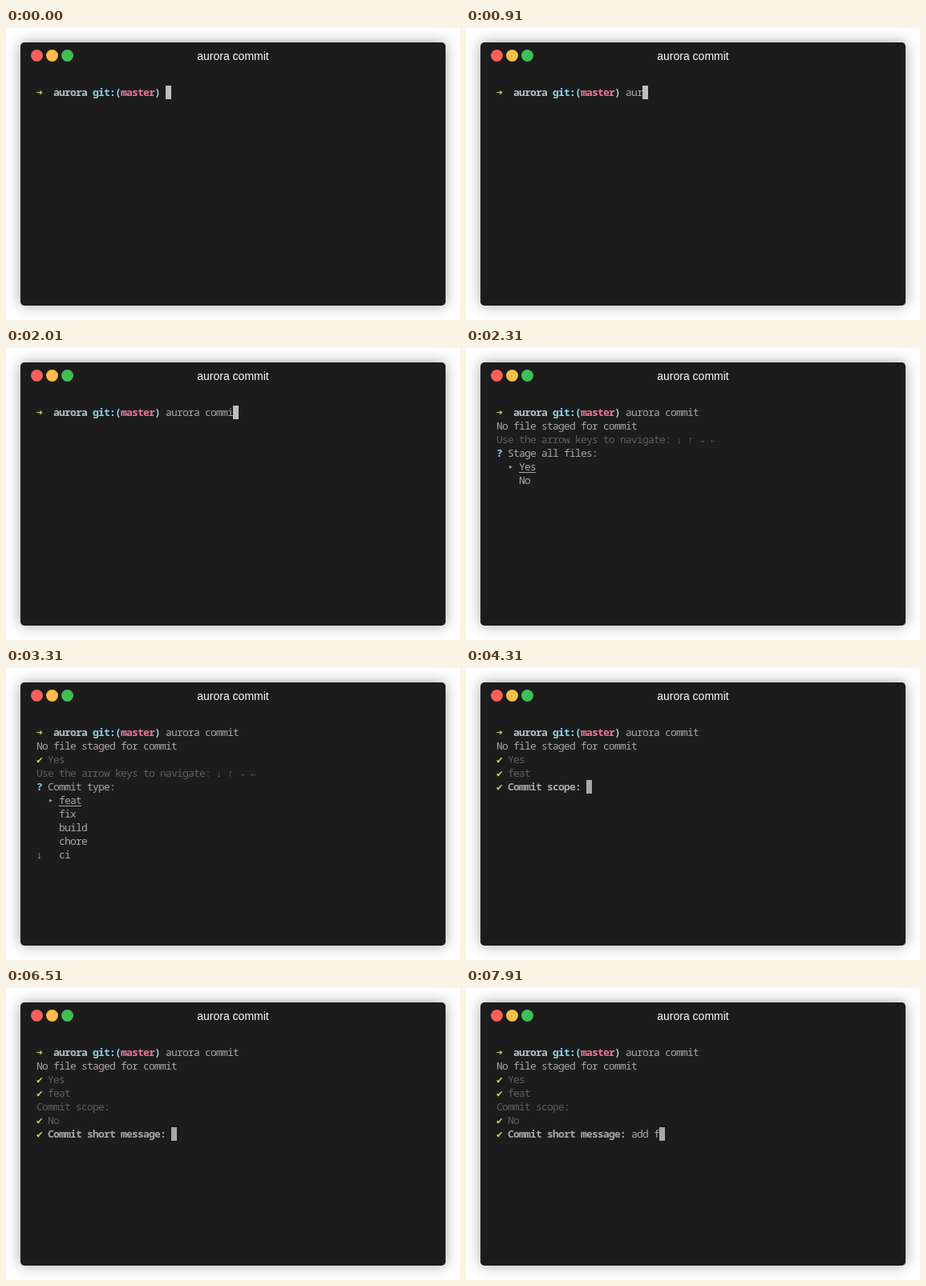
Recreate the animation shown at these times as an HTML page. Size 566 by 365 pixels, loop 8 s.

```html
<!DOCTYPE html>
<html lang="en">
<head>
<meta charset="utf-8">
<title>aurora commit</title>
<style>
  html, body { margin: 0; width: 100%; height: 100%; overflow: hidden; background: #fff; }
  #window {
    position: absolute; left: 18px; top: 18px; width: 530px; height: 329px;
    border-radius: 5px; background: #1c1c1c; box-shadow: 0 0 18px rgba(0, 0, 0, .35);
  }
  h1 {
    margin: 0; font: 14px/34px "Liberation Sans", Arial, sans-serif;
    color: #fff; text-align: center;
  }
  i { position: absolute; top: 9px; width: 15px; height: 15px; border-radius: 50%; }
  #screen {
    position: absolute; left: 20px; top: 54px; color: #a8a8a8;
    font: 13px/17px "Noto Sans Mono", "DejaVu Sans Mono", monospace;
    font-stretch: semi-condensed;
    letter-spacing: calc(7px - 1ch);
  }
  #screen span { position: absolute; white-space: pre; }
  .bold, .green, .dir, .blue, .pink { font-weight: bold; }
  .green { color: #bcd85a; }
  .dir { color: #b0c5c8; }
  .blue { color: #80d8e8; }
  .pink { color: #f2739b; }
  .dim { color: #5f5f5f; }
  .picked { text-decoration: underline; text-underline-offset: 2px; }
  .cursor, .block { width: 7px; height: 17px; background: #bfbfbf; }
  .block { background: #a8a8a8; }
</style>
</head>
<body>
<div id="window">
  <i style="left:13px;background:#f75f58"></i>
  <i style="left:32px;background:#fcbc4a"></i>
  <i style="left:51px;background:#3fbf58"></i>
  <h1>aurora commit</h1>
  <div id="screen"></div>
</div>
<script>
const LOOP = 8000, CELL = 7, LINE = 17;
const COMMAND = "aurora commit", MESSAGE = "add f";
const screenEl = document.getElementById("screen");
let html = "", shown = "";

function put(row, col, text, cls = "") {
  html += `<span class="${cls}" style="left:${col * CELL}px;top:${row * LINE}px">${text}</span>`;
}

function typed(text, t, keyTime) {
  return [...text].filter((_, i) => t >= keyTime(i)).join("");
}

function check(row, text, cls) {
  put(row, 0, "✔", "green");
  put(row, 2, text, cls);
}

function menu(row, question, options) {
  put(row, 0, "Use the arrow keys to navigate:", "dim");
  [..."↓↑→←"].forEach((arrow, i) => put(row, 32 + 2 * i, arrow, "dim"));
  put(row + 1, 0, "?", "blue");
  put(row + 1, 2, question);
  put(row + 2, 2, "▸");
  options.forEach((option, i) => put(row + 2 + i, 4, option, i ? "" : "picked"));
}

function input(row, label, value) {
  check(row, label, "bold");
  put(row, label.length + 3, value);
  put(row, label.length + 3 + value.length, "", "block");
}

function draw(t) {
  html = "";
  // The typist pauses around the space between the two words.
  const command = typed(COMMAND, t, i => 710 + 100 * (i + (i > 5) + (i > 6)));
  put(0, 0, "➜", "green");
  put(0, 3, "aurora", "dir");
  put(0, 10, "git:(", "blue");
  put(0, 15, "master", "pink");
  put(0, 21, ")", "blue");
  put(0, 23, command);

  if (t < 2210) put(0, 23 + command.length, "", "cursor");
  else if (t < 2310) put(1, 0, "", "cursor");
  else put(1, 0, "No file staged for commit");

  if (t >= 2310 && t < 2810) menu(2, "Stage all files:", ["Yes", "No"]);
  if (t >= 2810) check(2, "Yes", "dim");
  if (t >= 2810 && t < 3310) put(3, 0, "", "cursor");
  if (t >= 3310 && t < 4310) {
    menu(3, "Commit type:", ["feat", "fix", "build", "chore", "ci"]);
    put(9, 0, "↓");
  }
  if (t >= 4310) check(3, "feat", "dim");
  if (t >= 4310 && t < 5510) input(4, "Commit scope:", "");
  if (t >= 5510) put(4, 0, "Commit scope:", "dim");
  if (t >= 5510 && t < 6510) menu(5, "Breaking change:", ["No", "Yes"]);
  if (t >= 6510) {
    check(5, "No", "dim");
    input(6, "Commit short message:", typed(MESSAGE, t, i => 7510 + 100 * i));
  }
  if (html !== shown) screenEl.innerHTML = shown = html;
}

function tick() {
  draw(performance.now() % LOOP);
  requestAnimationFrame(tick);
}
tick();
</script>
</body>
</html>
```
